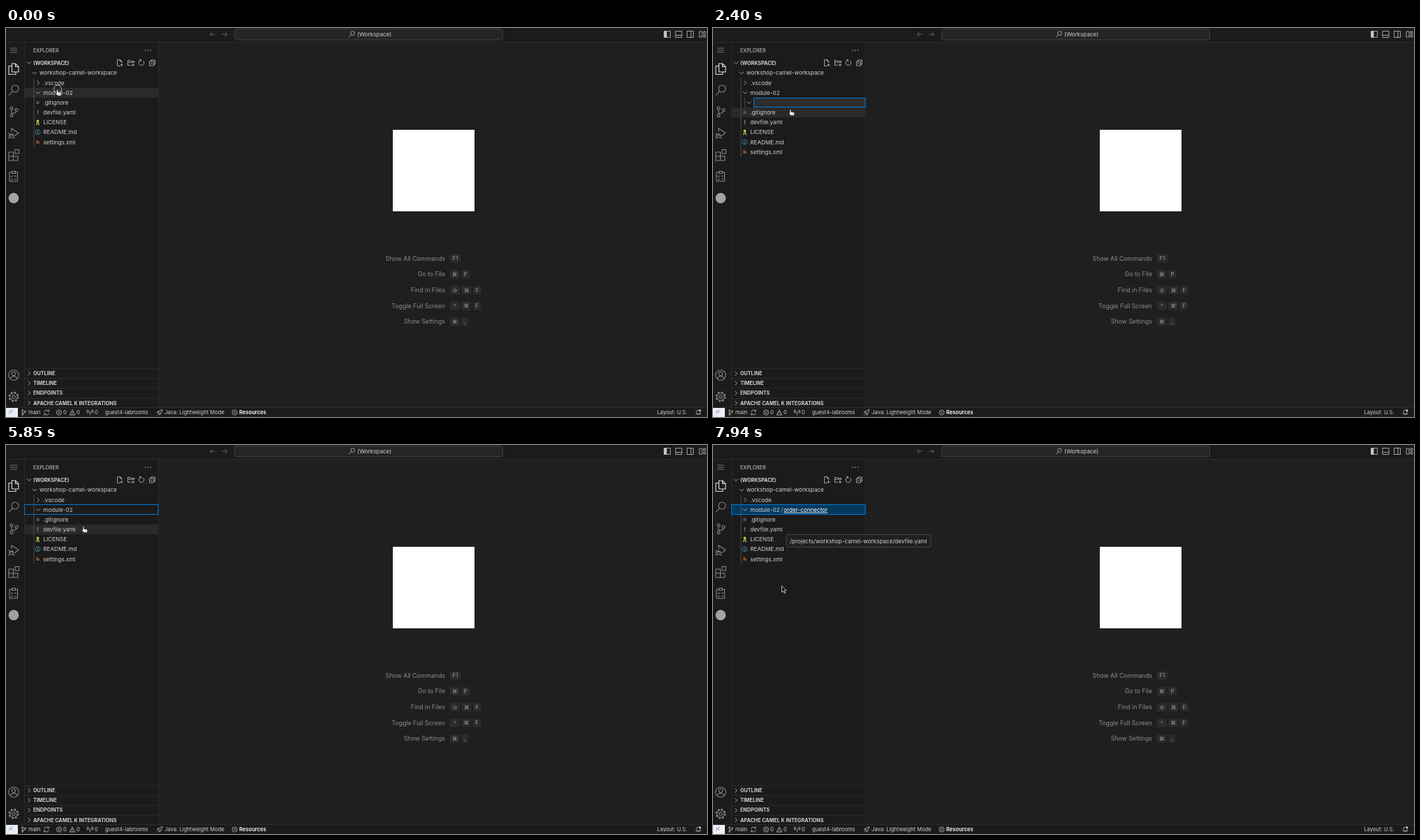
These frames come from a looping animation (1004 by 558 pixels, 8000 ms). An HTML page:

```html
<!DOCTYPE html>
<html lang="en">
<head>
<meta charset="utf-8">
<title>Workspace explorer</title>
<style>
html, body { margin: 0; width: 100%; height: 100%; overflow: hidden; background: #1b1b1b; }
svg { display: block; width: 1004px; height: 558px; }
text { stroke: none; fill: #d0d0d0; font: 8.15px Inter, "DejaVu Sans", sans-serif; white-space: pre; }
.head { font-size: 7.2px; font-weight: 700; }
.status { font-size: 7.6px; }
.hint { font-size: 8.78px; fill: #8c8c8c; text-anchor: end; }
.key { font-size: 7.4px; fill: #a8a8a8; text-anchor: middle; }
.tip { font-size: 8.1px; }
.end { text-anchor: end; }
</style>
</head>
<body>
<svg viewBox="0 0 1004 558" fill="none" stroke="#c5c5c5" stroke-width=".8">
  <g id="base"></g>
  <g id="live"></g>
</svg>
<script>
const LOOP = 8000, STEP = 150, ROW = 14.15, TOP = 64.5;
const PANEL = '#1b1b1b', BLUE = '#0078d4', SELECTED = '#04395e', EDGE = '#2b2b2b';

// Drawing helpers; y of a text is the middle of its capitals.
const text = (x, y, s, cls = '', style = '') =>
  `<text x="${x}" y="${y}" dy=".363em" class="${cls}" style="${style}">${s}</text>`;
const path = (d, attrs = '') => `<path d="${d}" ${attrs}/>`;
const rect = (x, y, w, h, fill, attrs = '') =>
  `<rect x="${x}" y="${y}" width="${w}" height="${h}" fill="${fill}" stroke="none" ${attrs}/>`;
const framed = (x, y, w, h, fill, stroke, r = 0) =>
  `<rect x="${x}" y="${y}" width="${w}" height="${h}" rx="${r}" fill="${fill}" stroke="${stroke}" stroke-width="1"/>`;
const circle = (x, y, r, attrs = '') => `<circle cx="${x}" cy="${y}" r="${r}" ${attrs}/>`;
const at = (x, y, body, attrs = '') => `<g transform="translate(${x} ${y})" ${attrs}>${body}</g>`;
const chevron = (x, y, open) => path(open ? `M${x - 3} ${y - 1.5}l3 3 3-3` : `M${x - 1.5} ${y - 3}l3 3-3 3`);

const sync = path('M-3.4-.8A3.5 3.5 0 0 1 3-1.8M3.4.8A3.5 3.5 0 0 1-3 1.8M3.4-4v2.3H1.2M-3.4 4V1.7h2.2');

function titleBar() {
  const box = 'M-4.5-4.5h9v9h-9z';
  return path('M300 9h-7.5m3-3l-3 3 3 3M309 9h7.5m-3-3l3 3-3 3', 'stroke="#777"') +
    framed(327.5, 1.5, 384, 15.5, '#252525', '#414141', 3) +
    circle(496.5, 7.6, 2.8) + path('M494.5 9.6l-3.3 3.6') + text(503, 9, '(Workspace)') +
    at(947, 9, path(box) + rect(-4.5, -4.5, 4, 9, '#c5c5c5')) +
    at(963.5, 9, path(box + 'M-4.5 1.5h9')) +
    at(980, 9, path(box + 'M1-4.5v9')) +
    at(997.5, 9, path('M-4.5-4h4v8h-4zM1.5-4h3v3h-3zM1.5 1h3v3h-3z'));
}

function activityBar() {
  const icons = [
    [89, circle(2, -2, 5) + path('M-1.6 1.6L-7 7.5')],
    [120, circle(-3, -5, 2) + circle(-3, 5.5, 2) + circle(4, -2.5, 2) + path('M-3-3V3.5M4-.5Q4 2.5-3 2.5')],
    [151, path('M-3-2v-5L7-.5 1 4') + circle(-3, 3.5, 2.7) + path('M-7.5 0l2 1.5M-7.5 4h1.8M-7.5 7.5l2-1.5M1.5 7.5l-2-1.5M-5 2.5h4')],
    [182, path('M-7-4H-.5V8H-7zM-7 2H6v6H-.5M2-7.5h5.5V-2H2z')],
    [213, path('M-2.5-6H-6V7H5.5V-6H2M-2.5-7.5h5v3h-5zM-4-.5l1 1 2-2M1-.5h3M-4 4l1 1 2-2M1 4h3')],
    [498, circle(0, 0, 7.3) + circle(0, -2, 2.7) + path('M-5 5Q-4 1.8 0 1.8T5 5')],
    [529, circle(0, 0, 2.2) + circle(0, 0, 5.3) + circle(0, 0, 6.5, 'stroke-width="2" stroke-dasharray="2.55 2.55"')]
  ];
  return path('M6 29h10M6 32h10M6 35h10', 'stroke="#868686"') +
    at(11, 58.5, path('M-2.5-7.5h5l4.5 4.5v7.5h-9.5zM2.5-7.5v4.5H7M-2.5-4H-7V8H3V4.5'), 'stroke="#ddd" stroke-width="1.1"') +
    icons.map(([y, body]) => at(11, y, body, 'stroke="#8a8a8a" stroke-width="1.05"')).join('') +
    circle(11, 244, 7.4, 'fill="#a2a2a2" stroke="none"');
}

function sidebar() {
  const sections = ['OUTLINE', 'TIMELINE', 'ENDPOINTS', 'APACHE CAMEL K INTEGRATIONS'];
  return text(39, 32, 'EXPLORER', '', 'font-size:7.15px') +
    [200, 203.7, 207.4].map(x => circle(x, 32, .7, 'fill="#c5c5c5" stroke="none"')).join('') +
    chevron(33, 50, true) + text(39, 50, '(WORKSPACE)', 'head') +
    sections.map((name, i) => {
      const y = 495.5 + i * ROW;
      return rect(26, y - 7.3, 192, 1, EDGE) + chevron(33, y) + text(39, y, name, 'head');
    }).join('');
}

function welcome() {
  const hints = [
    ['Show All Commands', 'F1'], ['Go to File', '⌘', 'P'], ['Find in Files', '⇧', '⌘', 'F'],
    ['Toggle Full Screen', '^', '⌘', 'F'], ['Show Settings', '⌘', ',']
  ];
  return rect(554, 146, 117, 117, '#fff') + hints.map(([label, ...keys], i) => {
    const y = 330.6 + i * 22.65;
    let x = 636;
    return text(629, y, label, 'hint') + keys.map(key => {
      const w = { F1: 15, '⌘': 13.5, '⇧': 14, '^': 13.5, ',': 9.5 }[key] || 11.5;
      const cap = rect(x, y - 6, w, 12, '#2c2c2c', 'rx="2"') + text(x + w / 2, y, key, 'key');
      x += w + 2.9;
      return cap;
    }).join('');
  }).join('');
}

function statusBar() {
  const y = 551.5;
  const label = (x, s, style) => text(x, y, s, 'status', style);
  const cross = circle(0, 0, 3.6) + path('M-1.5-1.5l3 3m0-3l-3 3');
  return rect(0, 545, 17, 13, '#eceef6') +
    path('M4 549l2.5 2.2L4 553.5M9.5 547.5L7 549.8l2.5 2.3', 'stroke="#5d6fae"') +
    at(25.5, y, circle(-1.8, -2.8, 1.1) + circle(-1.8, 2.8, 1.1) + circle(2, -1.5, 1.1) + path('M-1.8-1.7v3.4M2-.4Q2 1.2-1.8 1.4')) +
    label(32, 'main') + at(58, y, sync) +
    at(76, y, cross) + label(82, '0') +
    path('M95 547.8l3.8 7.2h-7.6zM95 550.2v2.4M95 553.3v.8') + label(101, '0') +
    at(120.5, y, path('M0-1V4M-2-3.5Q-3-1.5-2 .5M2-3.5Q3-1.5 2 .5M-3.5-4.2Q-5.2-1.5-3.5 1.2M3.5-4.2Q5.2-1.5 3.5 1.2')) + label(127, '0') +
    label(142, 'guest4-labrooms') +
    at(220, y, path('M-2 .5Q0-4 4-4 4 0-.5 2zM-2 .5l-1.7-.3 1.5-2 1.4.2M-.5 2l.3 1.7 2-1.5-.2-1.4M-4 4l1.6-1.6')) +
    label(227, 'Java: Lightweight Mode') +
    at(327.5, y, cross) + label(334, 'Resources', 'font-weight:600;fill:#fff') +
    label(932.5, 'Layout: U.S.') +
    at(991.5, y, path('M-3.5 2.2h7L2.5.7V-1A2.5 2.5 0 0 0-2.5-1V.7zM-1 2.5Q0 4.5 1 2.5')) + circle(994, 548.6, 1.3, 'fill="#ddd" stroke="none"');
}

document.getElementById('base').innerHTML =
  rect(0, 0, 1004, 558, PANEL) + rect(219, 21, 785, 523, '#1f1f1f') +
  rect(0, 20, 1004, 1, EDGE) + rect(0, 544, 1004, 1, EDGE) +
  rect(26, 21, 1, 523, EDGE) + rect(218, 21, 1, 523, EDGE) +
  titleBar() + activityBar() + sidebar() + welcome() + statusBar();

const toolbar =
  at(163, 50, path('M.5 4.5h-4v-9h4l2.5 2.5V0M.5-4.5V-2H3M2.5 1v4M.5 3h4')) +
  at(179, 50, path('M0 3.5h-4.5v-7h3l1 1.2h5V0M-4.5-.8h9M3 1v4M1 3h4')) +
  at(194, 50, path('M2.4-2.8A3.7 3.7 0 1 1-1-3.6M-3.2-4.5h2.6v2.6')) +
  at(209.5, 50, path('M-2-2v-2h6v6H2M-4-2h6v6h-6zM-2.5 1h3'));

const files = [
  ['.gitignore', rect(-2.2, -2.2, 4.4, 4.4, '#41535b')],
  ['devfile.yaml', path('M0-3.2V1M0 2v1.2', 'stroke="#a074c4" stroke-width="1.3"')],
  ['LICENSE', circle(0, -1.8, 1.5, 'fill="#cbcb41" stroke="#cbcb41"') + path('M-.7 0l-1 4M.7 0l1.2 4', 'stroke="#cbcb41" stroke-width="1.3"')],
  ['README.md', circle(0, 0, 3.4, 'stroke="#519aba"') + path('M0-2v.9M0-.3V2.1', 'stroke="#519aba" stroke-width="1"')],
  ['settings.xml', path('M-2-.3A2.3 2.3 0 0 1 .3 2M-2-2.2A4.2 4.2 0 0 1 2.2 2', 'stroke="#e37933" stroke-width="1"') + circle(-1.4, 1.4, .8, 'fill="#e37933" stroke="none"')]
];

const menuItems = [
  ['New File...'], ['New Folder...'], ['Open in Integrated Terminal'], null,
  ['Find in Folder...', '⇧⌥F'], null,
  ['Cut', '⌘X'], ['Copy', '⌘C'], ['Paste', '⌘V'], null,
  ['Upload...'], null,
  ['Copy Path', '⌥⌘C'], ['Copy Relative Path', '⇧⌥⌘C'], null,
  ['Rename...', 'Enter'], ['Delete Permanently', '⌘Backspace'], null,
  ['Create Kubernetes Config Map From all Files in Folder'],
  ['Create Kubernetes Secret From all Files in Folder']
];

function menu(pointerY) {
  let y = 103, out = framed(74.5, 92, 248.5, 282, '#1f1f1f', '#454545', 3);
  for (const item of menuItems) {
    if (!item) {
      out += rect(75, y - 5.2, 248, .9, '#454545');
      y += 7.1;
      continue;
    }
    const [label, keys = ''] = item, style = label === 'Paste' ? 'fill:#777' : '';
    if (Math.abs(pointerY - y) < 8.4) out += rect(78, y - 8.3, 242.5, 16.6, SELECTED, 'rx="1"');
    out += text(94, y, label, '', style) + text(304, y, keys, 'end', style);
    y += 16.75;
  }
  return out;
}

const tooltip = (x, w, name) => framed(x, 128.5, w, 18, '#202020', '#454545', 2) +
  text(x + 5.3, 137.6, '/projects/workshop-camel-workspace/' + name, 'tip');

// Value of the last [time, value] pair that has begun.
const held = (pairs, t) => pairs.reduce((value, [start, next]) => t >= start ? next : value, pairs[0][1]);

// Pointer tip: [time, x, y], straight lines between.
const track = [
  [0, 73.5, 88], [450, 73.5, 88], [900, 98, 103], [1050, 98, 103], [1500, 111, 116.5],
  [6900, 111, 116.5], [7050, 110, 116.5], [7500, 105, 117], [7650, 105, 118.5], [7800, 103, 150], [7950, 98.5, 202]
];
function pointerAt(t) {
  const i = Math.max(1, track.findIndex(key => key[0] >= t));
  const [t0, x0, y0] = track[i - 1], [t1, x1, y1] = track[i], k = (t - t0) / (t1 - t0);
  return [x0 + (x1 - x0) * k, y0 + (y1 - y0) * k];
}

const typed = [[0, 0], [3000, 1], [3150, 2], [3300, 3], [3450, 4], [3600, 5], [4050, 6], [4350, 7],
  [4500, 9], [4650, 10], [4800, 12], [5100, 13], [5250, 14], [5400, 15]];
const hand = path('M-1 .7Q0-.3 .9.7V3.7L5 4.6Q6 5 5.8 6.3L5.2 9.3H.7L-2.4 6Q-2.6 4.9-1 5.5z', 'fill="#fff" stroke="#111" stroke-width=".7"') +
  path('M2 6v2M3.6 6v2', 'stroke="#555" stroke-width=".5"');
const arrow = path('M0 0V9.2L2.2 7.2 3.8 10.8 5.3 10.1 3.7 6.7H6.6z', 'fill="#000" stroke="#eee"');

function scene(t) {
  const [px, py] = pointerAt(t);
  const menuOpen = t >= 600 && t < 1950;
  const editing = t >= 1950 && t < 5850;
  const created = t >= 6300;
  const rowY = i => TOP + i * ROW;
  const hover = Math.floor((py - TOP + ROW / 2) / ROW);
  const shift = editing ? 4 : 3;
  let out = menuOpen ? '' : toolbar;

  if (!menuOpen && hover < files.length + shift) out += rect(27, rowY(hover) - 7, 191, ROW, '#2a2a2b');
  if (menuOpen || t >= 5850)
    out += framed(26.5, rowY(2) - 7.3, 191.5, 14, created ? SELECTED : 'none', BLUE);

  out += rect(39.6, 71.5, .8, (files.length + shift - 1) * ROW, '#555') +
    chevron(41, rowY(0), true) + text(48, rowY(0), 'workshop-camel-workspace') +
    chevron(46, rowY(1)) + text(53.3, rowY(1), '.vscode') +
    chevron(46, rowY(2), true) + text(53.3, rowY(2), 'module-02');
  if (created)
    out += text(97.3, rowY(2), '/', '', 'fill:#9ab') +
      text(101.2, rowY(2), 'order-connector', '', 'fill:#fff;text-decoration:underline');
  out += files.map(([name, icon], i) =>
    at(45.5, rowY(i + shift), icon) + text(53.3, rowY(i + shift), name)).join('');

  if (editing) {
    const y = rowY(3);
    out += rect(45.2, y - 7, .8, ROW, '#555') + chevron(51.5, y, true) +
      framed(58.5, y - 6.45, 159.5, 13, '#2d2d2d', BLUE) +
      text(59.2, y, 'order-connector'.slice(0, held(typed, t)));
    if (t < 2400) out += rect(59.2, y - 5, .8, 10, '#ddd');
    if (t >= 3000) out += tooltip(39.5, 197, '.gitignore');
  }
  if (t >= 6300 && t < 6600)
    out += circle(16, 63.5, 5, `fill="${BLUE}" stroke="none"`) +
      circle(16, 63.5, 2.6, 'stroke="#fff" stroke-width=".6"') + path('M16 62v1.7h1.3', 'stroke="#fff" stroke-width=".6"');
  if (menuOpen) out += menu(py);
  if (t >= 7500) out += tooltip(105, 207, 'devfile.yaml');

  const ring = held([[0, 5.5], [150, 6.4], [300, 0], [1650, 5.5], [1800, 6.4], [1950, 0]], t);
  if (ring) out += circle(px + .6, py - .4, ring, `stroke="#ddd" opacity="${ring > 6 ? .45 : 1}"`);
  return out + at(px, py, py > 175 ? arrow : hand);
}

const live = document.getElementById('live');
let shown = -1;
function draw() {
  const now = performance.now() % LOOP;
  // The last pose arrives slightly before its regular step.
  const t = now >= 7940 ? 7950 : Math.floor(now / STEP) * STEP;
  if (t !== shown) live.innerHTML = scene(shown = t);
  requestAnimationFrame(draw);
}
draw();
</script>
</body>
</html>
```
